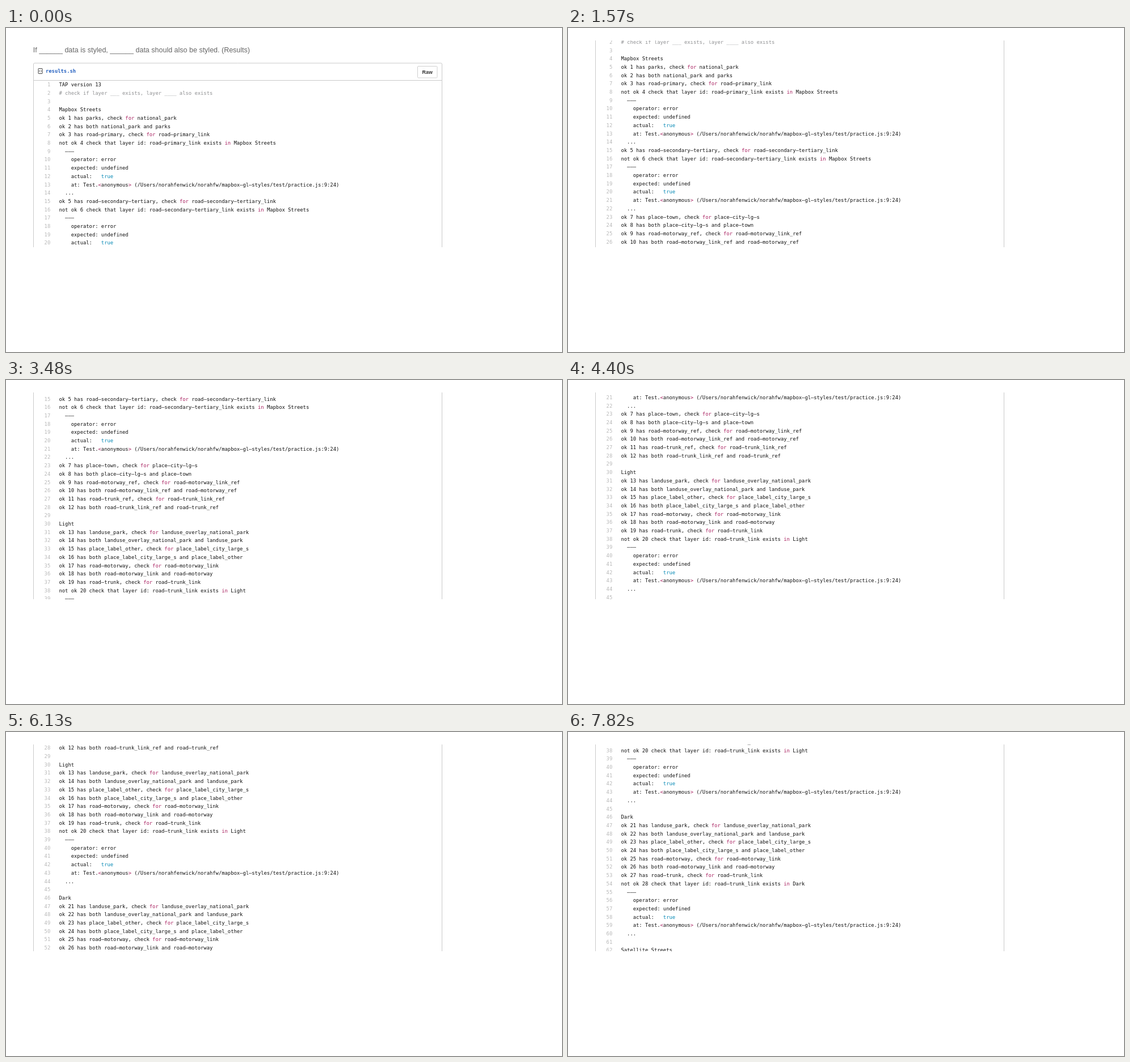
An HTML page with a canvas for the animation above (8000 ms loop, 980 px wide and 572 px high).

```html
<!DOCTYPE html>
<html lang="en">
<head>
<meta charset="utf-8">
<title>Test results</title>
<style>
  html, body { margin: 0; width: 100%; height: 100%; overflow: hidden; background: #fff; }
  canvas { display: block; }
</style>
</head>
<body>
<canvas id="stage" width="980" height="572"></canvas>
<script>
const ctx = document.getElementById('stage').getContext('2d');
const LOOP = 8000;
const VIEW = { top: 22, bottom: 387 };
const PITCH = 14.7, CHAR = 5.31, SIZE = 8.82;
const MONO = '"DejaVu Sans Mono", monospace';
const SANS = '"Liberation Sans", Arial, sans-serif';
const INK = '#111', RULE = '#cacaca';

// start ms, end ms, steps, scroll before, scroll after
const SWIPES = [
  [500, 1210, 7, 0, 65],
  [1330, 2100, 8, 65, 144],
  [2190, 2390, 3, 144, 162],
  [2780, 3570, 10, 162, 275.5],
  [3660, 4400, 9, 275.5, 363.3],
  [4480, 5210, 9, 363.3, 440],
  [5330, 5620, 4, 440, 465],
  [6130, 6840, 8, 465, 550],
  [7350, 7820, 6, 550, 611.4]
];

const failure = [
  '  ---',
  '    operator: error',
  '    expected: undefined',
  '    actual:   true',
  '    at: Test.<anonymous> (/Users/norahfenwick/norahfw/mapbox-gl-styles/test/practice.js:9:24)',
  '  ...'
];
const has = (n, a, b) => `ok ${n} has ${a}, check for ${b}`;
const pair = (n, a, b) => [has(n, a, b), `ok ${n + 1} has both ${b} and ${a}`];
const missing = (n, id, style) =>
  [`not ok ${n} check that layer id: ${id} exists in ${style}`, ...failure];
const failing = (n, id, style) =>
  [has(n, id, id + '_link'), ...missing(n + 1, id + '_link', style)];
const simpleStyle = (name, n) => [
  name,
  ...pair(n, 'landuse_park', 'landuse_overlay_national_park'),
  ...pair(n + 2, 'place_label_other', 'place_label_city_large_s'),
  ...pair(n + 4, 'road-motorway', 'road-motorway_link'),
  ...failing(n + 6, 'road-trunk', name),
  ''
];

const lines = [
  'TAP version 13',
  '# check if layer ___ exists, layer ____ also exists',
  '',
  'Mapbox Streets',
  'ok 1 has parks, check for national_park',
  'ok 2 has both national_park and parks',
  ...failing(3, 'road-primary', 'Mapbox Streets'),
  ...failing(5, 'road-secondary-tertiary', 'Mapbox Streets'),
  ...pair(7, 'place-town', 'place-city-lg-s'),
  ...pair(9, 'road-motorway_ref', 'road-motorway_link_ref'),
  ...pair(11, 'road-trunk_ref', 'road-trunk_link_ref'),
  '',
  ...simpleStyle('Light', 13),
  ...simpleStyle('Dark', 21),
  'Satellite Streets'
];

function colorOf(token) {
  if (token[0] === '#') return '#8f9092';
  if (token === 'true') return '#0086b3';
  return /^(for|in|<|>)$/.test(token) ? '#a71d5d' : INK;
}

// Split every line into coloured runs with their column.
const rows = lines.map(line => {
  let col = 0;
  return line.split(/(^#.*|\bfor\b|\bin\b|\btrue\b|[<>])/).filter(Boolean).map(text => {
    const run = { text, col, color: colorOf(text) };
    col += text.length;
    return run;
  });
});

// Set large and scaled down, so glyph advances stay fractional.
function label(text, x, y, size, family, color, weight = 400) {
  ctx.save();
  ctx.translate(x, y);
  ctx.scale(0.1, 0.1);
  ctx.font = `${weight} ${size * 10}px ${family}`;
  ctx.fillStyle = color;
  ctx.fillText(text, 0, 0);
  ctx.restore();
}

// The code face has wide hyphens.
const code = (text, x, y, color, weight) =>
  label(text.replace(/-/g, '–'), x, y, SIZE, MONO, color, weight);

function frame(x, y, w, h, r, color) {
  ctx.strokeStyle = color;
  ctx.lineWidth = 1;
  ctx.beginPath();
  ctx.roundRect(x, y, w, h, r);
  ctx.stroke();
}

function drawIcon() {
  frame(57, 71.5, 7, 9, 0.5, '#444');
  ctx.lineWidth = 0.8;
  ctx.beginPath();
  for (const side of [-1, 1]) {
    ctx.moveTo(60.5 + side * 0.7, 74.3);
    ctx.lineTo(60.5 + side * 2.2, 76);
    ctx.lineTo(60.5 + side * 0.7, 77.7);
  }
  ctx.stroke();
}

function drawHeader() {
  label('If ______ data is styled, ______ data should also be styled. (Results)',
    47.8, 42.5, 12.5, SANS, '#666');
  drawIcon();
  code('results.sh', 70, 79.2, '#2460c0', 700);
  frame(725.5, 67.5, 34.5, 20.5, 1.5, '#cfcfcf');
  label('Raw', 733.5, 81.2, 8.9, SANS, '#333', 700);
  ctx.fillStyle = RULE;
  ctx.fillRect(48, 92, 720, 1);
}

function drawRow(runs, i) {
  const y = 103.1 + i * PITCH;
  const number = String(i + 1);
  code(number, 78.2 - number.length * CHAR, y, '#b8b8b8');
  for (const { text, col, color } of runs) code(text, 93.5 + col * CHAR, y, color);
}

function scrollAt(t) {
  let pos = 0;
  for (const [start, end, steps, from, to] of SWIPES) {
    if (t < start) break;
    const step = Math.floor((t - start) / (end - start) * (steps - 1) + 0.1) + 1;
    const p = Math.min(1, step / steps);
    pos = from + (to - from) * p * p * (3 - 2 * p);
  }
  return pos;
}

function draw(t) {
  const scroll = scrollAt(t);
  ctx.fillStyle = '#fff';
  ctx.fillRect(0, 0, 980, 572);
  ctx.save();
  ctx.beginPath();
  ctx.rect(0, VIEW.top, 980, VIEW.bottom - VIEW.top);
  ctx.clip();
  ctx.translate(0, -scroll);
  frame(48.5, 62, 720, 1200, 2, RULE);
  if (scroll < 80) drawHeader();
  rows.forEach((runs, i) => {
    const y = 100 + i * PITCH - scroll;
    if (y > VIEW.top - 10 && y < VIEW.bottom + 10) drawRow(runs, i);
  });
  ctx.restore();
}

const begin = performance.now();
function tick() {
  draw((performance.now() - begin) % LOOP);
  requestAnimationFrame(tick);
}
tick();
</script>
</body>
</html>
```
